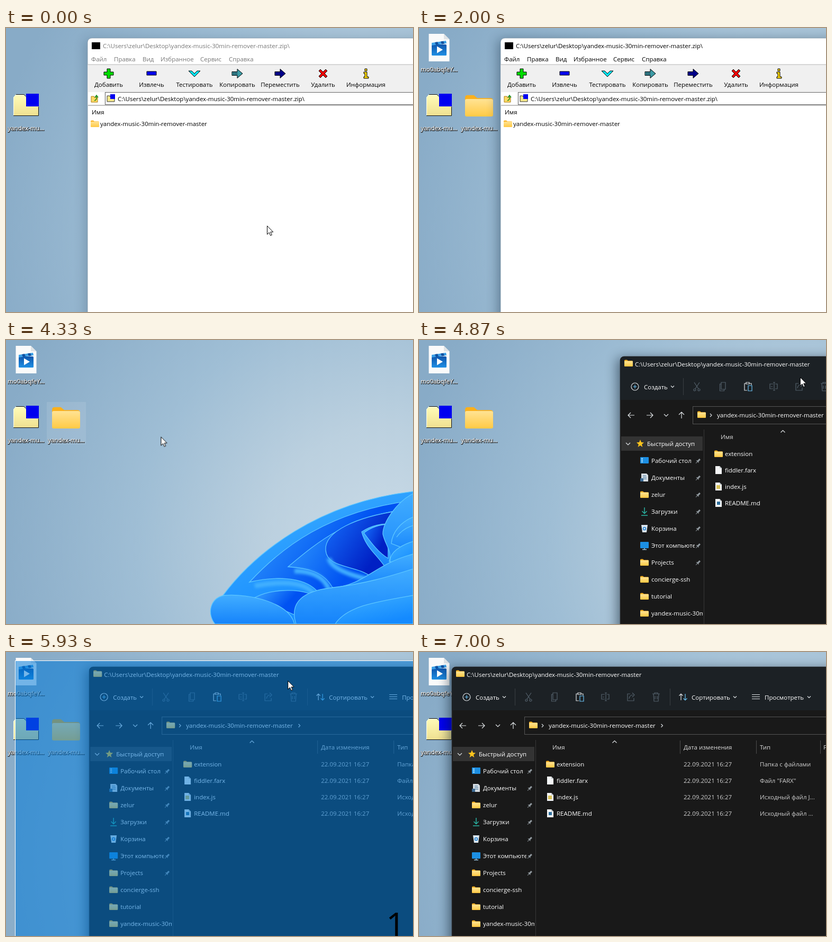
Write an HTML page that moves like this. It is 769 by 536 pixels and loops after 8270 ms.

```html
<!DOCTYPE html>
<html lang="ru">
<head>
<meta charset="utf-8">
<title>Desktop</title>
<style>
html, body { margin: 0; width: 100%; height: 100%; overflow: hidden; background: #8fb0cb; }
svg { display: block; }
text { font: 11.5px "Open Sans", "Noto Sans", sans-serif; white-space: pre; }
.mid { text-anchor: middle; }
.label { fill: #fff; stroke: #fff; stroke-width: .25; }
.under { fill: #111; stroke: #111; stroke-opacity: .6; stroke-width: 1.6; }
.shadow { filter: blur(11px); }
.line { fill: none; stroke: #dfe3e6; stroke-width: 1.2; }
.dim { stroke: #53606b; }
.edge { stroke: #5cc6ff; stroke-width: 1.3; }
.sheen { fill: none; stroke: #42b0ff; stroke-width: 9; filter: blur(2.5px); }

[id] { animation: 8.27s linear infinite paused; }
#video, #names, #castA, #head, #row, #folder, #hover, #short, #full, #arrow, #stop, #plus { animation-timing-function: step-end; }
#pointer { animation-name: pointer; }
#arrow { animation-name: arrow; }
#stop { animation-name: stop; }
#plus { animation-name: plus; }
#video { animation-name: video; }
#names { animation-name: wake; }
#castA { animation-name: cast; }
#head { animation-name: head; }
#row { animation-name: row; }
#folder { animation-name: folder; }
#hover { animation-name: hover; }
#short { animation-name: short; }
#full { animation-name: full; }
#archive { animation-name: archive; transform-origin: 700px 465px; }
#explorer { animation-name: explorer; transform-origin: 380px 270px; }
#zone { animation-name: zone; }

@keyframes pointer {
  0% { transform: translate(493px, 373px); }
  2.42% { transform: translate(430px, 320px); }
  4.84% { transform: translate(300px, 162px); }
  6.45%, 8.87% { transform: translate(283px, 176px); }
  15.32% { transform: translate(161px, 227px); }
  19.35% { transform: translate(114px, 165px); }
  24.18%, 35.47% { transform: translate(790px, 40px); }
  42.72%, 48.37% { transform: translate(112px, 150px); }
  52.4% { transform: translate(292.500px, 182.500px); }
  58.85% { transform: translate(720px, 70px); }
  62%, 63.69% { transform: translate(760px, 57px); }
  68.52% { transform: translate(666px, 52px); }
  71.75% { transform: translate(532px, 54px); }
  74.97%, 79.81% { transform: translate(443px, 54px); }
  84.64%, 100% { transform: translate(800px, 90px); }
}
@keyframes arrow { 0% { opacity: 1; } 10.08% { opacity: 0; } 15.72%, 100% { opacity: 1; } }
@keyframes stop { 0% { opacity: 0; } 10.08% { opacity: 1; } 15.72%, 100% { opacity: 0; } }
@keyframes plus { 0% { opacity: 0; } 15.72% { opacity: 1; } 19.75%, 100% { opacity: 0; } }
@keyframes video { 0% { opacity: 0; } 9.27%, 100% { opacity: 1; } }
@keyframes wake { 0% { fill: #777; } 9.27%, 100% { fill: #000; } }
@keyframes cast { 0% { opacity: .22; } 9.27%, 100% { opacity: .42; } }
@keyframes head { 0% { opacity: 0; } 4.43% { opacity: 1; } 6.05%, 100% { opacity: 0; } }
@keyframes row { 0% { opacity: 0; } 9.27% { opacity: 1; } 22.97%, 100% { opacity: 0; } }
@keyframes folder { 0% { opacity: 0; } 22.17%, 100% { opacity: 1; } }
@keyframes hover { 0% { opacity: 0; } 41.5% { opacity: 1; } 54.41%, 100% { opacity: 0; } }
@keyframes short { 0% { opacity: 1; } 43.13% { opacity: 0; } 46.35%, 100% { opacity: 1; } }
@keyframes full { 0% { opacity: 0; } 43.13% { opacity: 1; } 46.35%, 100% { opacity: 0; } }
@keyframes archive {
  0%, 32.25% { transform: none; opacity: 1; }
  34.66% { transform: scale(.967); opacity: .45; }
  36.28%, 100% { transform: scale(.945); opacity: 0; }
}
@keyframes explorer {
  0%, 54.82% { transform: translate(380px, 31px) scale(.93); opacity: 0; }
  58.04%, 63.69% { transform: translate(380px, 31px) scale(1); opacity: 1; }
  68.52% { transform: translate(286px, 26px) scale(1); }
  71.75% { transform: translate(157px, 28px) scale(1); }
  74.97%, 100% { transform: translate(62px, 28px) scale(1); opacity: 1; }
}
@keyframes zone { 0%, 68.52% { opacity: 0; } 70.94%, 75.78% { opacity: 1; } 77.39%, 100% { opacity: 0; } }
</style>
</head>
<body>
<script>
const LOOP = 8270, STEP = 200 / 3;
const USER = 'zelur', PROJECT = 'yandex-music-30min-remover-master';
const HOME = `C:\\Users\\${USER}\\Desktop\\${PROJECT}`;

const text = (x, y, s, attrs = '') => `<text x="${x}" y="${y}" ${attrs}>${s}</text>`;
const label = (x, y, s) => text(x + .6, y + 1, s, 'class="mid under"') + text(x, y, s, 'class="mid label"');
const at = (x, y, body, more = '') => `<g transform="translate(${x} ${y}) ${more}">${body}</g>`;
const path = (d, attrs = '') => `<path d="${d}" ${attrs}/>`;
const rect = (x, y, w, h, fill, attrs = '') => `<rect x="${x}" y="${y}" width="${w}" height="${h}" fill="${fill}" ${attrs}/>`;
const line = (d, dim) => path(d, `class="line ${dim ? 'dim' : ''}"`);
const fade = (id, from, to, dir = 'x2="0" y2="1"') =>
  `<linearGradient id="${id}" x1="0" y1="0" ${dir}><stop stop-color="${from}"/><stop offset="1" stop-color="${to}"/></linearGradient>`;

const FOLDER = 'M0 2q0-1.500 1.500-1.500h3.500l2 1.700h7.500q1.500 0 1.500 1.500v7.500q0 1.500-1.500 1.500h-13q-1.500 0-1.500-1.500z';
const folder = (x, y, k = 1) => at(x, y,
  path(FOLDER, 'fill="#fbb01c"') + rect(0, 2.7, 16, 10, 'url(#gFold)', 'rx="1"'), `scale(${k})`);
const page = (x, y, mark) => at(x, y, path('M0 0h8l4 4v11h-12z', 'fill="#f4f6f7"') + path('M8 0v4h4z', 'fill="#b9c0c5"') + mark);

const defs = `<defs>
  <radialGradient id="gSky" gradientUnits="userSpaceOnUse" cx="720" cy="390" r="760">
    <stop stop-color="#cadbe7"/><stop offset=".3" stop-color="#bbd0df"/><stop offset=".62" stop-color="#9fbed5"/><stop offset="1" stop-color="#88abc7"/>
  </radialGradient>
  ${fade('gFold', '#ffe394', '#ffca45')}${fade('gZip', '#fffbb8', '#efe090')}${fade('gFilm', '#0f56ad', '#1f8fe4')}
  ${fade('gBack', '#3fb0ff', '#148aff', 'x2=".5" y2="1"')}${fade('gDeep', '#38a6ff', '#0052f2', 'x2=".7" y2=".3"')}
  ${fade('gDark', '#1673ff', '#0020c4', 'x2=".8" y2=".5"')}${fade('gFront', '#41adff', '#1583fb')}
</defs>`;

function bloom() {
  const petals = [
    ['M410 482C470 402 590 306 769 286V536H400z', 'gBack'],
    ['M460 457C520 392 610 322 769 303V480H590L586 472C560 446 505 446 460 457z', 'gDeep'],
    ['M533 428C590 380 650 330 769 318V470H622L616 466C600 438 570 430 533 428z', 'gDeep'],
    ['M604 396C602 362 660 334 744 322V436L690 447C662 424 606 432 604 396z', 'gDark'],
    ['M672 362C690 350 712 345 730 348V416L716 428C700 404 680 392 672 362z', 'gFront'],
    ['M676 364C692 352 708 348 722 348V412C704 402 688 380 676 364z', 'gDark'],
    ['M712 366C712 345 738 305 769 290V440L724 418C730 398 716 386 712 366z', 'gFront'],
    ['M728 384C730 362 746 344 769 334V400z', 'gFront'],
    ['M726 418C724 402 744 388 769 380V440z', 'gBack'],
    ['M616 468C680 462 694 424 769 404V470z', 'gFront'],
    ['M470 486C500 470 545 470 572 478L548 520z', 'gDeep'],
    ['M395 536C380 518 384 488 412 482C460 478 536 496 545 536z', 'gFront'],
    ['M548 536C534 492 566 474 612 468C680 460 725 446 769 432V536z', 'gFront'],
    ['M622 536C644 502 700 494 769 482V536z', 'gBack']
  ];
  const sheen = 'M470 464Q560 448 582 480M545 436Q596 436 610 470M610 412Q616 436 686 452';
  const paint = list => list.map(([d, g]) => path(d, `class="edge" fill="url(#${g})"`)).join('');
  return paint(petals.slice(0, 4)) + path(sheen, 'class="sheen"') + paint(petals.slice(4))
    + path('M738 372C746 360 756 354 769 350', 'class="edge" fill="none"');
}

function desktop() {
  const zip = path('M14 131l4-5h16l4 5h24v35h-48z', 'fill="url(#gZip)"') + path('M14.500 165v-34l4-4h15', 'fill="none" stroke="#fffff0"')
    + path('M14 165.500h47.500v-17M19 125.500h15l3 3', 'fill="none" stroke="#111"');
  const film = path('M18.500 11h28.500l10.500 10.500v41.500h-39z', 'fill="#fafafa"') + path('M47 11v10.500h10.500z', 'fill="#dfe3e6"')
    + rect(24, 31, 28, 21, 'url(#gFilm)', 'rx="1.500"') + path('M24 28l27-4 1 5-28 4z', 'fill="#3b9fe6"')
    + path('M30 27l5-.700 2 5-5 .700zM41 25.400l5-.700 2 5-5 .700z', 'fill="#0f4f9f"') + path('M34 34.500l11 6.500-11 6.500z', 'fill="#fff"');
  const name = ['yandex-', 'music-30min-', 'remover-m...'].map((s, i) => label(114, 193 + i * 14, s)).join('');
  return rect(0, 0, 769, 536, 'url(#gSky)') + bloom()
    + `<g id="video">${film}${label(38, 82, 'mo0abqfeY...')}</g>`
    + zip + rect(38, 124, 24, 24, '#0000f0') + label(38, 193, 'yandex-mu...')
    + `<g id="hover">${rect(77.5, 117.5, 73, 79, '#fff', 'fill-opacity=".100" stroke="#fff" stroke-opacity=".060"')}</g>`
    + `<g id="folder">${folder(87, 125, 3.31)}<g id="short">${label(114, 193, 'yandex-mu...')}</g>`
    + `<g id="full">${rect(77, 183, 74, 43, '#fff', 'fill-opacity=".140"')}${name}</g></g>`;
}

function archive() {
  const menu = [[161, 'Файл'], [204, 'Правка'], [258, 'Вид'], [292, 'Избранное'], [367, 'Сервис'], [421, 'Справка']];
  const ink = c => `fill="${c}" stroke="#000"`;
  const arrow = 'M-10-3.500h10v-5l10 8.500-10 8.500v-5h-10z';
  const tools = [
    ['Добавить', path('M-3-9h6v6h6v6h-6v6h-6v-6h-6v-6h6z', ink('#00dc00'))],
    ['Извлечь', path('M-9-4h18v7h-18z', ink('#0000ee'))],
    ['Тестировать', path('M-11-5h6l5 5 5-5h6l-11 11z', ink('#00e4f4'))],
    ['Копировать', path(arrow, ink('#3c9aa4')) + path('M-7-4v8M-4-4v8M-1-4v8', 'stroke="#123"')],
    ['Переместить', path(arrow, ink('#000088'))],
    ['Удалить', path('M-8-5l3-3 5 5 5-5 3 3-5 5 5 5-3 3-5-5-5 5-3-3 5-5z', ink('#f00000'))],
    ['Информация', path('M-2-9h4v4h-4zM-4-3h6v9h3v3h-9v-3h2v-6h-2z', ink('#ffd800'))]
  ];
  const up = path('M161 129h5l1 2h6v9h-12z', 'fill="#ffd964" stroke="#a97b12"') + path('M167 137q5-1 4-8m-3 2l3-4 3 4', 'fill="none" stroke="#138a13" stroke-width="1.500"');
  return `<g id="archive"><g id="castA">${rect(150, 22, 680, 600, '#0b2338', 'class="shadow"')}</g>`
    + rect(154, 19, 700, 600, '#fff', 'rx="8" stroke="#7d93a5" stroke-width=".800"')
    + rect(162, 27, 16, 13, '#000')
    + `<g id="names">${text(183, 38, HOME + '.zip\\')}${menu.map(([x, s]) => text(x, 63, s)).join('')}</g>`
    + rect(154.5, 69, 700, 77, '#f0f0f0') + rect(154.5, 68.5, 700, 1, '#b5b5b5')
    + tools.map(([s, g], i) => at(194 + i * 81, 86, g) + text(194 + i * 81, 111, s, 'class="mid"')).join('')
    + rect(155, 121, 31, 24, '#fff') + up
    + rect(187.5, 121.5, 700, 23, '#fff', 'stroke="#666"') + rect(155, 145.5, 700, 1, '#888')
    + path('M191 128h5l1 2h8v9h-14z', 'fill="#f6e88c" stroke="#333"') + rect(197, 125, 9, 9, '#0000f0') + text(211, 138, HOME + '.zip\\')
    + `<g id="head">${rect(156, 147, 700, 22, '#d9ebf9')}</g>` + text(162, 163, 'Имя')
    + folder(160, 174) + text(178, 185, PROJECT)
    + `<g id="row">${at(160, 174, path(FOLDER, 'fill="#659a99"'))}`
    + rect(176.5, 171.5, 210, 18, '#0078d7', 'stroke="#e59a3c" stroke-dasharray="1 1"') + text(178, 185, PROJECT, 'fill="#fff"') + '</g></g>';
}

function commands() {
  const down = x => line(`M${x - 3} 55.500l3 3 3-3`);
  const bar = x => rect(x, 41, 1, 32, '#3a3f43');
  const mark = (x, d, dim) => at(x, 57, line(d, dim));
  const accent = (x, d) => at(x, 57, path(d, 'class="line" style="stroke:#6cc4f5"'));
  return at(28, 57, '<circle r="7" class="line"/>') + accent(28, 'M-3.500 0h7M0-3.500v7')
    + text(45, 62, 'Создать') + down(99) + bar(119)
    + mark(145, 'M-5-8l8 12M5-8l-8 12M-6 6a2 2 0 1 0 4 0a2 2 0 1 0-4 0M2 6a2 2 0 1 0 4 0a2 2 0 1 0-4 0', 1)
    + mark(194, 'M-3-8h8v13h-8zM-3-5h-2.500v13h8v-3', 1)
    + mark(242, 'M-2 7h-5v-13h3m6 0h4v3M-4-8h6v3h-6z') + accent(242, 'M0-2h7v10h-7z')
    + mark(290, 'M-1-5h-6v9h6M3-5h4v9h-4M1-8v15M-1-8h4M-1 7h4M-5 0h3', 1)
    + mark(338, 'M-1-6h-5v13h12v-5M-3 3q1-7 7-7M3-8l4 4-4 4', 1)
    + mark(386, 'M-7-6h14M-3-6v-2h6v2M-5-6l1 14h8l1-14M-2-2v6M2-2v6', 1) + bar(412)
    + mark(437, 'M-4 6v-12m-3.500 3.500l3.500-3.500 3.500 3.500') + accent(437, 'M4-6v12m-3.500-3.500l3.500 3.500 3.500-3.500')
    + text(453, 62, 'Сортировать') + down(535)
    + mark(575, 'M-8-4.500h15M-8-.500h15M-8 3.500h15') + text(591, 62, 'Просмотреть') + down(675);
}

function sidebar() {
  const screen = rect(-8, -7, 16, 12, '#1c8fe3', 'rx="1"');
  const icons = {
    'Рабочий стол': screen + path('M-6-4h3M-6-1h3M-6 2h3', 'stroke="#c9ecff" stroke-width="1.500"'),
    'Документы': path('M-6-8h10l3 3v12h-13z', 'fill="#d6dde3"') + path('M-3-4h6M-3-1h7M-3 2h7', 'stroke="#3a7199"') + rect(-8, 1, 6, 6, '#3c6a92'),
    'Загрузки': path('M0-8v11M-4.500-1l4.500 4.500 4.500-4.500M-6 7h12', 'fill="none" stroke="#2bb5a4" stroke-width="1.500"'),
    'Корзина': path('M-6-7h12l-2 14h-8z', 'fill="#dbe6ee"') + '<circle r="2.500" fill="none" stroke="#1b7dd0" stroke-width="1.500"/>',
    'Этот компьютер': screen + path('M0 5v2M-4 7.500h8', 'stroke="#9fc6df" stroke-width="1.500"')
  };
  const items = ['Рабочий стол', 'Документы', USER, 'Загрузки', 'Корзина', 'Этот компьютер', 'Projects', 'concierge-ssh', 'tutorial', PROJECT, 'src'];
  const pin = path('M-1-5h3l0 5 2 2h-7l2-2zM0 2h1v4h-1z', 'fill="#8f979d"');
  return rect(2, 151, 154, 27, '#333') + line('M11 163l4 4 4-4')
    + path('M38 157l2 5 5 .400-4 3.500 1.400 5.100-4.400-3-4.400 3 1.400-5.100-4-3.500 5-.400z', 'fill="#fcc41d"') + text(51, 169, 'Быстрый доступ')
    + items.map((s, i) => at(0, 197 + i * 32, at(46, 0, icons[s] || folder(-8, -7))
      + `<svg x="59" y="-10" width="${i < 7 ? 82 : 97}" height="22">${text(0, 14, s)}</svg>`
      + (i < 7 ? at(147, 0, pin, 'rotate(45)') : ''))).join('')
    + rect(158, 138, 1, 500, '#383838');
}

function files() {
  const rows = [
    ['extension', 'Папка с файлами', folder(178, -7)],
    ['fiddler.farx', 'Файл "FARX"', page(180, -8, '')],
    ['index.js', 'Исходный файл J...', page(180, -8, rect(2, 5, 7, 7, '#d8c25a'))],
    ['README.md', 'Исходный файл ...', page(180, -8, rect(3, 5, 6, 6, '#2e6f9e'))]
  ];
  const heads = [[190, 'Имя'], [438, 'Дата изменения'], [582, 'Тип'], [702, 'Размер']];
  return `<g fill="#dcdcdc">${heads.map(([x, s]) => text(x, 156, s)).join('')}</g>`
    + [431, 575, 696].map(x => rect(x, 139, 1, 25, '#4d4d4d')).join('') + line('M303.500 143.500l4-4 4 4')
    + rows.map(([name, type, icon], i) => at(0, 184 + i * 31, icon + text(198, 4, name)
      + `<g fill="#cfcfcf">${text(438, 4, '22.09.2021 16:27')}${text(582, 4, type)}</g>`)).join('');
}

function explorer() {
  return `<g id="explorer" fill="#fff">${rect(-5, 4, 900, 620, '#061625', 'class="shadow" opacity=".550"')}`
    + rect(0, 0, 900, 620, '#191919', 'rx="8" stroke="#3a4045" stroke-width=".800"')
    + path('M0 82v-74q0-8 8-8h890v82z', 'fill="#1c2125"')
    + folder(8, 6) + text(28, 19, HOME) + commands()
    + line('M27 111h-12m5-5l-5 5 5 5M50 111h12m-5-5l5 5-5 5M83 109l4 4 4-4M116 117v-12m-5 5l5-5 5 5')
    + rect(137.5, 94.5, 800, 33, '#191919', 'stroke="#555"') + folder(146, 103)
    + line('M170 108l3 3-3 3M395.500 108l3 3-3 3') + text(183, 115, PROJECT) + sidebar() + files() + '</g>';
}

const zone = () => `<g id="zone">${rect(17.5, 16.5, 1400, 1000, '#0078d7', 'fill-opacity=".540" stroke="#fff"')}`
  + text(718, 538, '1', 'style="font-size:64px"') + '</g>';

const pointer = () => '<g id="pointer"><g id="arrow">'
  + path('M.500.500v16l3.700-3.500 2.500 5.700 2.600-1.100-2.500-5.600h5z', 'fill="#fff" stroke="#000"') + '</g>'
  + '<g id="stop"><circle r="7" fill="#fff" stroke="#c8101a" stroke-width="2.200"/>' + path('M-5-5l10 10', 'stroke="#c8101a" stroke-width="2.200"') + '</g>'
  + `<g id="plus">${rect(10.5, 14.5, 10, 10, '#fff', 'stroke="#555"')}${path('M13 19.500h5M15.500 17v5', 'stroke="#1560b0" stroke-width="1.400"')}</g></g>`;

document.body.innerHTML = `<svg width="769" height="536" viewBox="0 0 769 536">${defs}${desktop()}${archive()}${explorer()}${zone()}${pointer()}</svg>`;

const motions = document.getAnimations();
function tick(now) {
  const time = Math.floor((now % LOOP + 4) / STEP) * STEP;
  for (const m of motions) m.currentTime = time;
  requestAnimationFrame(tick);
}
tick(performance.now());
</script>
</body>
</html>
```
